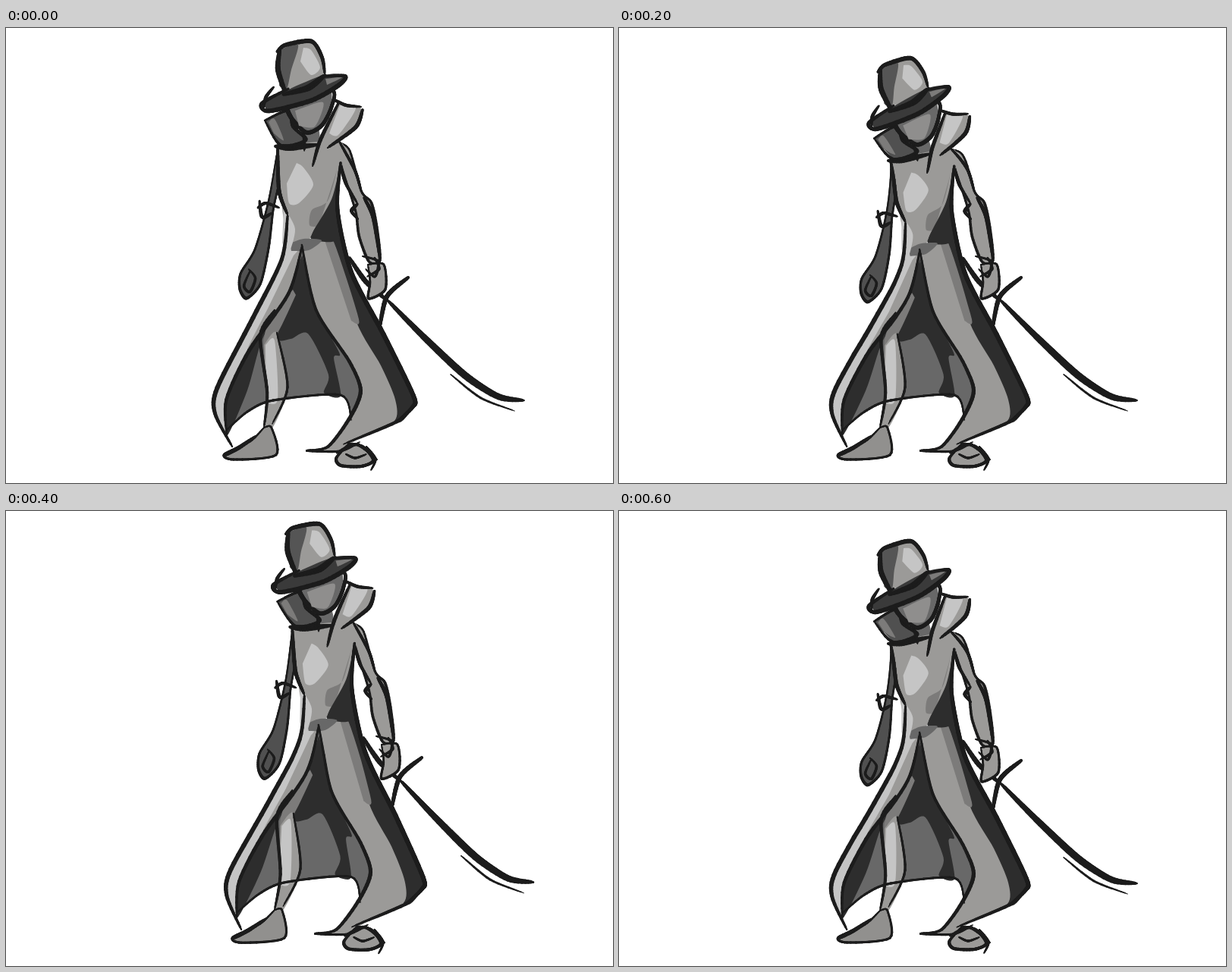
Recreate the animation shown at these times as an HTML page with a canvas. Size 800 by 600 pixels, loop 0.8 s.

```html
<!DOCTYPE html>
<html lang="en">
<head>
<meta charset="utf-8">
<title>Swordsman idle</title>
<style>
  html, body { margin: 0; width: 100%; height: 100%; overflow: hidden; background: #fff; }
  canvas { display: block; }
</style>
</head>
<body>
<canvas id="stage" width="800" height="600"></canvas>
<script>
const ctx = document.getElementById('stage').getContext('2d');
const INK = '#1c1c1c', DARK = '#2d2d2d', DEEP = '#505050', DUSK = '#686868',
      SHADE = '#7c7b7a', MID = '#9b9a98', LIGHT = '#c5c5c5';

const clamp = v => Math.max(0, Math.min(1, v));
const leftness = x => clamp((460 - x) / 110);
const belly = y => Math.sin(Math.PI * clamp((y - 130) / 450));

const stand = (x, y) => [x, y];

// The left side sinks, the head tips over
function crouch(x, y) {
  const side = leftness(x);
  const bx = x + 11 * side * belly(y);
  const by = y + 17 * side * clamp((430 - y) / 260);
  const turn = -0.122, rx = x - 400, ry = y - 182;
  const hx = 402 + rx * Math.cos(turn) - ry * Math.sin(turn);
  const hy = 195 + rx * Math.sin(turn) + ry * Math.cos(turn) - ry * .05;
  const k = clamp((190 - y) / 45);
  return [bx + k * (hx - bx), by + k * (hy - by)];
}

// The whole body shifts right, least at the feet
function lean(x, y) {
  const slide = 18 - 8 * clamp((y - 330) / 240) - .055 * Math.max(0, 150 - y);
  return [x + slide + 7 * leftness(x) * belly(y), y - 4 * Math.sin(Math.PI * y / 560)];
}

const POSES = [stand, crouch, lean, crouch];
let pose = stand, seed = 1;

function random() {
  seed = seed * 16807 % 2147483647;
  return seed / 2147483647 - .5;
}

const reverse = text => text.split(' ').reverse().join(' ');

// Smooth line through the points, eight steps for each span
function curve(text) {
  const pts = text.split(' ').map(p => p.split(',').map(Number)), out = [];
  const at = i => pts[Math.max(0, Math.min(pts.length - 1, i))];
  for (let i = 0; i < pts.length - 1; i++) {
    for (let s = 0; s < 8; s++) {
      const t = s / 8, h = t * t * (3 - 2 * t);
      out.push([0, 1].map(n => {
        const a = at(i)[n], b = at(i + 1)[n];
        const m0 = .4 * (b - at(i - 1)[n]), m1 = .4 * (at(i + 2)[n] - a);
        return a + (b - a) * h + m0 * t * (1 - t) ** 2 - m1 * t * t * (1 - t);
      }));
    }
  }
  return [...out, at(pts.length - 1)];
}

function fill(color, text) {
  ctx.fillStyle = color;
  ctx.beginPath();
  curve(text).forEach(([x, y]) => ctx.lineTo(...pose(x, y)));
  ctx.fill();
}

// Sketchy brush: tapered passes beside each other
function ink(width, text, passes = 2, spread = 2) {
  const line = curve(text), end = line.length - 1;
  for (let pass = 0; pass < passes; pass++) {
    const dx = pass ? spread * random() : 0, dy = pass ? spread * random() : 0;
    let prev;
    line.forEach(([x, y], i) => {
      const bow = Math.sin(Math.PI * i / end);
      const next = pose(x + dx * (bow + .3), y + dy * (bow + .3));
      if (prev) {
        ctx.lineWidth = width * (.4 + .6 * Math.sqrt(Math.abs(bow)));
        ctx.beginPath();
        ctx.moveTo(...prev);
        ctx.lineTo(...next);
        ctx.stroke();
      }
      prev = next;
    });
  }
}

function shape(color, width, text) {
  fill(color, text);
  ink(width, text + ' ' + text.split(' ')[0]);
}

function sword() {
  ink(5, '453,303 475,334 505,361');
  ink(5, '505,361 550,406 605,457 650,486 682,491', 6, 8);
  ink(2, '586,457 625,488 670,505');
  ink(6, '530,329 502,354 492,398');
}

function arms() {
  shape(DEEP, 3, '357,165 346,228 328,292 309,324 308,345 317,357 335,338 346,290 352,240 360,200');
  ink(4, '332,237 342,231 360,237');
  ink(4, '334,228 337,249 350,244');
  ink(3, '322,320 314,340 322,348 329,330 320,318');
  shape(MID, 3, '440,151 453,162 468,215 481,230 488,262 492,306 478,308 465,275 460,240 442,182');
  ink(5, '472,224 484,250 493,306');
  ink(4, '463,232 455,241 464,252');
  shape(MID, 3, '477,312 498,312 500,345 478,357 480,335');
  ink(3, '470,301 490,308 486,328 474,318');
  ink(3, '486,303 492,318 476,328');
}

const flank = '441,178 437,240 455,322 498,405 537,485 536,500 515,520';
const panel = '371,248 363,305 325,382 278,474 275,508 298,552';
const inner = '390,288 372,350 320,425 290,490 291,538';
const seam = '390,286 409,372 453,440 468,478 455,512 425,552 396,557';
const hem = '291,530 318,506 352,491 441,484 455,517';

function coat() {
  fill(DUSK, inner + ' ' + hem + ' 468,478 453,440 409,372');
  fill(DARK, '390,300 358,404 375,410 398,403 425,457 419,481 441,485 432,435 440,430 418,390');
  fill(DARK, inner + ' 318,478 338,410 372,352');
  fill(DARK, flank + ' 480,470 405,285 402,272 430,225');
  fill(LIGHT, panel + ' ' + reverse(inner));
  fill(MID, '379,300 390,292 372,350 318,425 345,370');
  fill(SHADE, '378,345 346,388 340,418 358,402 382,352');
  fill(MID, '340,418 357,402 371,474 352,526 340,526 343,490');
  fill(LIGHT, '342,418 354,412 358,490 343,494');
  fill(MID, seam + ' 440,556 470,538 512,518 513,490 494,445 462,388 432,284 405,281');
  fill(SHADE, '420,280 432,282 465,384 455,386');
}

function torso() {
  fill(DUSK, '391,130 411,130 412,156 390,156');
  fill(MID, '359,160 390,152 440,150 445,172 428,235 408,263 389,294 368,262 362,215');
  fill(SHADE, '437,185 424,228 403,240 400,260 412,262');
  fill(DARK, '441,178 429,226 404,270 407,280 438,278 438,225');
  fill(DUSK, '374,284 392,278 416,280 399,293 376,294');
  fill(LIGHT, '383,178 392,184 405,207 386,231 373,231 370,205');
  fill(LIGHT, '366,236 381,265 372,298 364,283');
}

function coatLines() {
  ink(5, '358,158 360,215 371,246');
  ink(5, panel);
  ink(4, inner);
  ink(4, seam);
  ink(3, hem);
  ink(6, flank);
  ink(3, '536,500 515,520 445,549', 3, 5);
  ink(4, '354,372 335,405 344,480 340,526');
  ink(3, '357,402 371,474 351,522');
  ink(4, '440,151 460,188 468,214');
  ink(4, '441,181 448,205 463,231');
}

function feet() {
  shape('#91908e', 3, '340,527 322,545 288,562 300,569 356,563 350,527');
  ink(5, '290,563 308,553 330,538');
  shape(MID, 4, '452,548 435,567 441,577 468,578 484,570 470,552');
  ink(4, '436,560 462,549 489,569');
  ink(3, '448,562 460,567 475,562');
  ink(3, '475,552 487,568 481,583');
  ink(3, '396,558 440,558 466,546');
}

function collar() {
  shape(DEEP, 4, '341,122 372,109 378,130 395,148 362,155');
  fill(SHADE, '346,124 354,120 366,148 353,139');
  fill(MID, '437,99 468,106 461,130 425,157 409,168 414,147');
  fill(LIGHT, '440,102 461,106 438,141 426,139');
  ink(4, '431,94 448,102 468,104');
  ink(5, '470,108 461,131 424,158');
  ink(4, '439,97 414,147 404,182');
  ink(3, '355,156 378,158 413,154', 4, 6);
  ink(3, '392,139 393,162');
}

function head() {
  shape(DUSK, 5, '371,86 372,112 395,138 416,129 429,104 429,82');
  fill('#8f8e8d', '381,109 418,98 407,130 386,129');
  ink(6, '371,85 371,108 384,132');
  fill(MID, '362,28 402,18 413,32 419,60 388,79 361,78');
  fill('#555', '362,28 385,22 376,55 370,80 360,76');
  fill(LIGHT, '392,26 402,29 414,52 402,62 388,44');
  ink(6, '361,28 359,55 371,92');
  ink(5, '357,31 368,22 402,17 416,38 420,60');
  fill('#3a3a3a', '337,98 372,81 419,62 447,62 435,77 370,106 345,110');
  fill(SHADE, '421,67 443,65 423,75');
  ink(5, '372,80 337,99 346,109 402,95 438,75 447,63 418,64');
  ink(5, '366,88 400,80 421,62', 3, 6);
  ink(3, '353,78 343,92 340,105');
}

function draw() {
  seed = 7;
  ctx.fillStyle = '#fff';
  ctx.fillRect(0, 0, 800, 600);
  ctx.strokeStyle = INK;
  ctx.lineCap = 'round';
  [sword, arms, coat, torso, coatLines, feet, collar, head].forEach(part => part());
}

let shown = -1;
function tick(now) {
  const beat = Math.floor(now / 200) % POSES.length;
  if (beat !== shown) {
    shown = beat;
    pose = POSES[beat];
    draw();
  }
  requestAnimationFrame(tick);
}
tick(performance.now());
</script>
</body>
</html>
```
